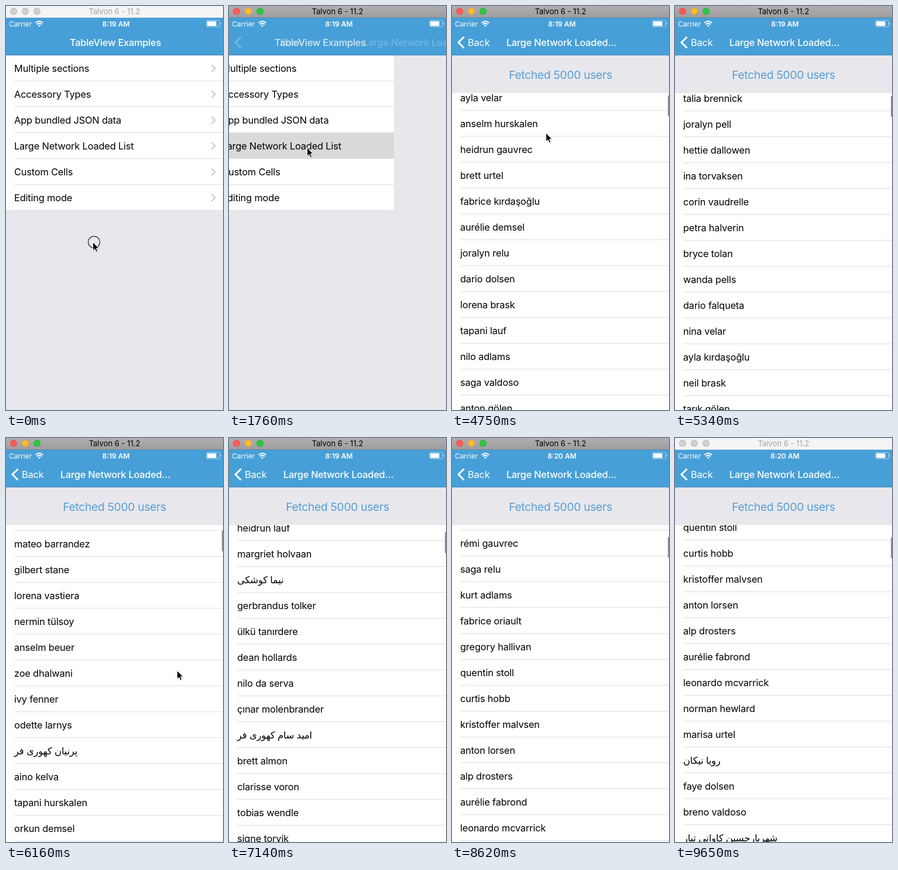
Write an HTML page that moves like this. It is 371 by 687 pixels and loops after 9750 ms.

```html
<!DOCTYPE html>
<html lang="en">
<head>
<meta charset="utf-8">
<title>TableView Examples</title>
<style>
  html, body { margin: 0; width: 100%; height: 100%; overflow: hidden; }
  body { position: relative; font: 400 16.4px Inter, "DejaVu Sans", sans-serif; letter-spacing: -.18px; color: #000; }
  body * { position: absolute; box-sizing: border-box; white-space: nowrap; }
  #stage { left: 0; top: 0; width: 371px; height: 687px; overflow: hidden; background: #e8e7ec; }
  #bar { left: 0; top: 0; width: 371px; height: 20px; line-height: 19px; text-align: center; font-size: 13px;
    letter-spacing: 0; background: linear-gradient(#b0aeb0, #9f9d9f); border-bottom: 1px solid #85898d; }
  #bar i { top: 3px; width: 12px; height: 12px; border-radius: 50%; background: var(--c); border: 1px solid #0000001c; }
  #bar.idle { background: #f4f4f4; color: #a3a3a3; border-color: #e6e8ea; }
  #bar.idle i { background: #d0d0d0; }
  #nav { left: 0; top: 19px; width: 371px; height: 65px; background: #479fd7; border-bottom: 1px solid #4088b5;
    color: #fff; overflow: hidden; }
  #nav .title { left: 1.5px; top: 21px; width: 371px; line-height: 44px; text-align: center; font-weight: 500; letter-spacing: -.25px; }
  #nav .status { top: 3px; line-height: 17px; font-size: 12px; letter-spacing: 0; }
  #clock { left: 148px; width: 80px; text-align: center; font-weight: 600; }
  #back { left: 0; top: 21px; width: 80px; height: 44px; line-height: 44px; }
  #backLabel { left: 27px; }
  svg { left: 0; top: 0; overflow: visible; }
  .page { left: 0; top: 84px; width: 371px; height: 603px; background: #e8e7ec; overflow: hidden; }
  .row { left: 0; width: 371px; height: 44px; line-height: 44px; padding-left: 14px; background: #fff; direction: ltr; }
  .row::after { content: ""; position: absolute; left: 14px; right: 0; bottom: 0; height: 1px; background: #dfdee2; }
  #menu .row:nth-of-type(6)::after { left: 0; }
  #count { left: 0; top: 0; width: 371px; line-height: 66px; text-align: center; font-size: 19.2px;
    letter-spacing: -.28px; color: #559fd5; }
  #list { left: 0; top: 64px; width: 371px; height: 539px; background: #fff; overflow: hidden; }
  #rows { left: 0; top: 0; width: 371px; }
  #thumb { left: 368.5px; width: 4px; height: 36px; border-radius: 2px; background: #929295; }
</style>
</head>
<body>
<div id="stage">
  <div id="menu" class="page"></div>
  <div id="users" class="page">
    <div id="count"></div>
    <svg id="spinner" width="1" height="1"></svg>
    <div id="list"><div id="rows"></div><div id="thumb"></div></div>
  </div>
  <div id="nav">
    <span class="status" style="left:5px">Carrier</span>
    <svg width="371" height="65" viewBox="0 19 371 65" fill="none" stroke="#fff">
      <g stroke-width="1.9">
        <path d="M50.5 28.7Q57 23.2 63.5 28.7M52.8 31.3Q57 27.7 61.2 31.3"/>
        <path d="M54.9 33.2Q57 31.4 59.1 33.2L57 35.4Z" fill="#fff" stroke="none"/>
      </g>
      <rect x="342.5" y="24.5" width="23" height="11" rx="2.5" opacity=".5"/>
      <path d="M344 26h15.5v8h-15.5zM366.7 28.2q2 1.8 0 3.6z" fill="#fff" stroke="none"/>
    </svg>
    <span class="status" id="clock"></span>
    <div class="title" id="oldTitle">TableView Examples</div>
    <div class="title" id="newTitle">Large Network Loaded…</div>
    <div id="back">
      <svg width="30" height="44"><path d="M20.5 12.500L11 22l9.500 9.500" fill="none" stroke="#fff" stroke-width="3"/></svg>
      <span id="backLabel">Back</span>
    </div>
  </div>
  <div id="bar">
    <i style="left:7px;--c:#fc5b57"></i><i style="left:27px;--c:#fdbc2e"></i><i style="left:47px;--c:#2ac940"></i>
    <span style="left:0;width:371px">Talvon 6 - 11.2</span>
  </div>
  <svg width="371" height="687">
    <circle id="ring" cx="150.5" cy="401.5" r="10" fill="none" stroke="#000" stroke-width="1.1"/>
    <g id="cursor">
      <path d="M1 2V16l3-3 2.300 5 2.400-1-2.200-4.800H11z" fill="#000" opacity=".18"/>
      <path d="M0 0V14.500L3.300 11.400 5.600 16.400 8 15.300 5.800 10.500H10.300z" fill="#000" stroke="#fff" stroke-width="1"/>
    </g>
  </svg>
</div>
<script>
const $ = id => document.getElementById(id);
const LOOP = 9750, ROW = 44, W = 371;

// runs of picture changes: first, last, number of steps
const BURSTS = [
  [290, 1100, 13], [1520, 2410, 14], [2530, 3490, 13], [3610, 3850, 3], [3910, 4090, 4],
  [4450, 5400, 17], [5460, 6390, 17], [6450, 7380, 17], [7430, 8390, 18], [8450, 9420, 18],
  [9480, 9480, 1], [9650, 9650, 1]
];
// list offset over time; each stretch slows down like a thrown list
const SCROLL = [
  [4450, 0], [5340.6, 1333], [5500, 1407], [6157.5, 3070], [6500, 3369],
  [7147.5, 4373], [7200, 4417], [7700, 6274], [8621.2, 7867], [9480, 8114]
];
// pointer: time, x, y; it leaves the stage between throws
const POINTER = [
  [290, 148, 401], [1100, 133, 240], [1700, 133, 240], [2410, 133, 363], [4450, 133, 363],
  [4620, 140, 140], [5150, 290, 700], [5400, 290, 700], [5500, 292, 560], [5680, 300, 61],
  [6157.5, 292, 395], [6450, 290, 520], [6680, 298, 107], [7050, 300, 700], [7160, 300, 700],
  [7230, 296, 540], [7400, 300, 112], [7650, 292, 480], [7880, 300, -30]
];

const NAMES = {
  30: 'talia brennick,joralyn pell,hettie dallowen,ina torvaksen,corin vaudrelle,petra halverin,bryce tolan,' +
    'wanda pells,dario falqueta,nina velar,ayla kırdaşoğlu,neil brask,tarık gölen',
  70: 'mateo barrandez,gilbert stane,lorena vastiera,nermin tülsoy,anselm beuer,zoe dhalwani,ivy fenner,' +
    'odette larnys,پرنیان کهوری فر,aino kelva,tapani hurskalen,orkun demsel',
  99: 'heidrun lauf,margriet holvaan,نیما کوشکی,gerbrandus tolker,ülkü tanırdere,dean hollards,nilo da serva,' +
    'çınar molenbrander,امید سام کهوری فر,brett almon,clarisse voron,tobias wendle,signe torvik',
  179: 'rémi gauvrec,saga relu,kurt adlams,fabrice oriault,gregory hallivan,quentin stoll,curtis hobb,' +
    'kristoffer malvsen,anton lorsen,alp drosters,aurélie fabrond,leonardo mcvarrick,norman hewlard,' +
    'marisa urtel,رویا نیکان,faye dolsen,breno valdoso,شهریارحسین کاوانی تبار'
};
const people = [];
for (const start in NAMES) NAMES[start].split(',').forEach((n, i) => people[+start + i] = n);
const pool = Object.values(people).filter(n => n[0] < '\u0600').map(n => n.split(' '));
for (let i = 0; i < 200; i++) {
  people[i] ??= pool[i * 7 % pool.length][0] + ' ' + pool[(i * 13 + 5) % pool.length].at(-1);
}

function addRow(parent, text, i) {
  const row = document.createElement('div');
  row.className = 'row';
  row.style.top = i * ROW + 'px';
  row.textContent = text;
  parent.append(row);
  return row;
}
people.forEach((n, i) => addRow($('rows'), n, i));

const menuRows = ['Multiple sections', 'Accessory Types', 'App bundled JSON data',
  'Large Network Loaded List', 'Custom Cells', 'Editing mode'].map((label, i) => {
  const row = addRow($('menu'), label, i);
  row.insertAdjacentHTML('beforeend', '<svg width="371" height="44"><path d="M351.500 16l6 6-6 6" ' +
    'fill="none" stroke="#c7c7cc" stroke-width="2"/></svg>');
  return row;
});

$('spinner').innerHTML = Array.from({ length: 12 }, (_, i) =>
  `<line x1="186.500" x2="186.500" y1="69.500" y2="64.800" stroke="#77777b" stroke-width="2" stroke-linecap="round" transform="rotate(${i * 30} 186.500 74)"/>`).join('');
const spokes = [...$('spinner').children];

const clamp = v => Math.max(0, Math.min(1, v));

function snap(t) {
  const run = BURSTS.findLast(b => b[0] <= t);
  if (!run) return t;
  const [from, to, n] = run;
  if (n < 2) return from;
  const step = (to - from) / (n - 1);
  return from + step * Math.min(n - 1, Math.floor((t - from + 8) / step));
}

function along(table, t, ease) {
  const last = table.at(-1);
  if (t <= table[0][0]) return table[0].slice(1);
  if (t >= last[0]) return last.slice(1);
  const i = table.findIndex(k => k[0] > t);
  const [a, b] = [table[i - 1], table[i]];
  const p = ease(t - a[0], b[0] - a[0]);
  return a.slice(1).map((v, j) => v + (b[j + 1] - v) * p);
}
const slowing = (u, d) => Math.expm1(-u / 500) / Math.expm1(-d / 500);
const smooth = (u, d) => (1 - Math.cos(Math.PI * u / d)) / 2;

const shift = (el, x, y = 0) => el.style.transform = `translate(${x}px,${y}px)`;

function draw(raw) {
  const t = snap(raw);
  $('bar').className = t < 290 || t >= 9650 ? 'idle' : '';
  $('clock').textContent = t < 7900 ? '8:19 AM' : '8:20 AM';
  $('ring').style.display = raw < 60 ? '' : 'none';

  const push = 1 - Math.pow(1 - clamp((t - 1680) / 520), 3);
  shift($('menu'), -W * .3 * push);
  shift($('users'), W * (1 - push));
  shift($('oldTitle'), -130 * push);
  shift($('newTitle'), 180 * (1 - push));
  shift($('backLabel'), 80 * (1 - push));
  $('oldTitle').style.opacity = 1 - push;
  $('newTitle').style.opacity = $('back').style.opacity = push;
  menuRows[3].style.background = t >= 1520 ? '#d9d9d9' : '#fff';

  const loaded = t >= 4020;
  $('count').textContent = (loaded ? 'Fetched' : 'Fetching') + ' 5000 users';
  $('list').style.display = loaded ? '' : 'none';
  $('spinner').style.display = loaded ? 'none' : '';
  const lead = 9 + Math.floor((t - 3700) / 80);
  spokes.forEach((s, i) => {
    const age = (((lead - i) % 12) + 12) % 12;
    s.style.opacity = Math.max(.22, .85 - age * .11);
  });

  const offset = Math.round(along(SCROLL, t, slowing)[0]);
  shift($('rows'), 0, -offset);
  shift($('thumb'), 0, 2 + offset * .0023);
  $('thumb').style.display = t >= 4450 ? '' : 'none';

  const [x, y] = along(POINTER, t, smooth);
  $('cursor').setAttribute('transform', `translate(${x + .5} ${y + .5})`);
}

const began = performance.now();
function tick() {
  draw((performance.now() - began) % LOOP);
  requestAnimationFrame(tick);
}
tick();
</script>
</body>
</html>
```
